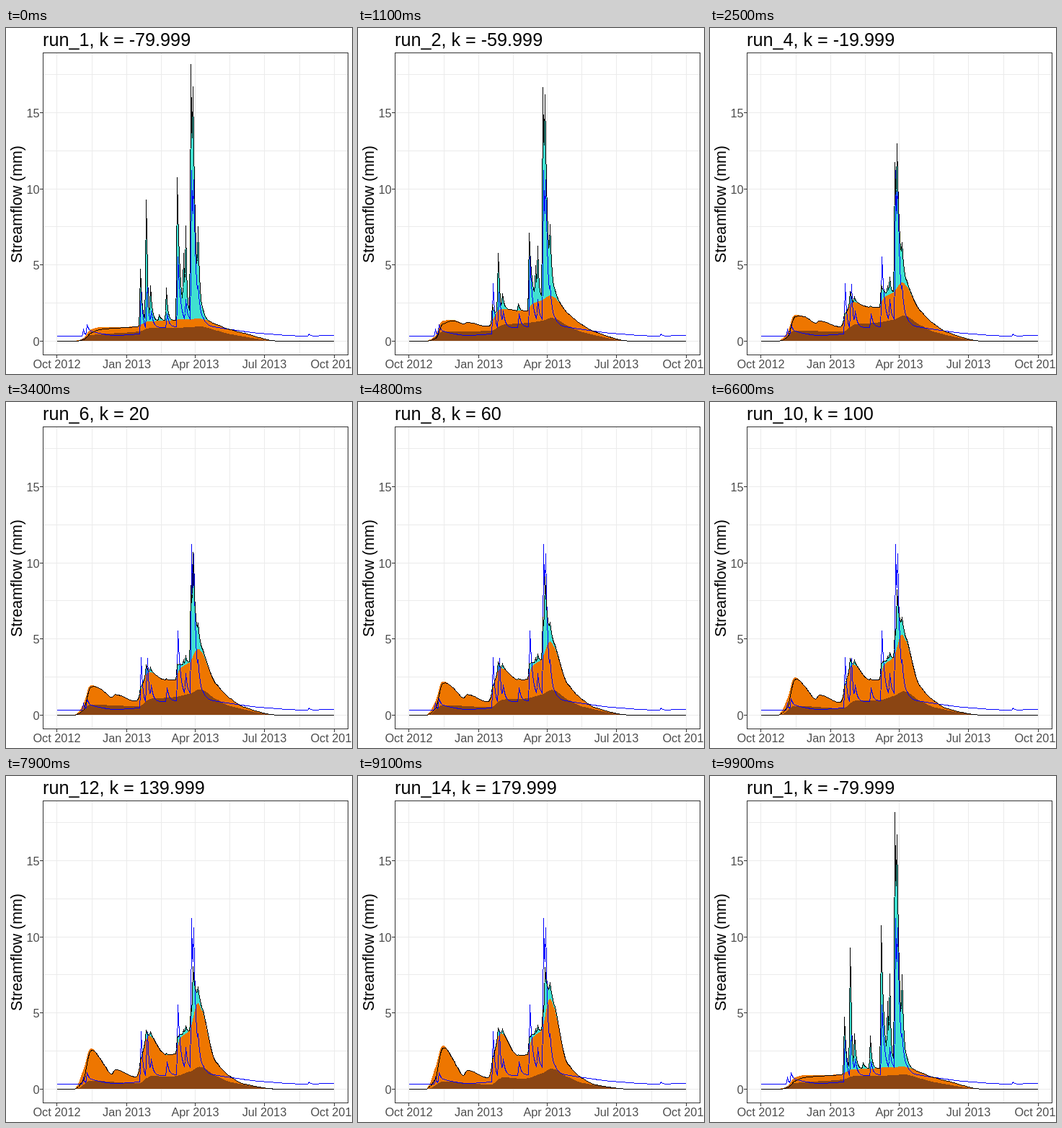
An HTML page that plays this animation: 480x480 px, repeating every 10 s.

```html
<!DOCTYPE html>
<html lang="en">
<head>
<meta charset="utf-8">
<title>Streamflow by run</title>
<style>
  html, body { margin: 0; width: 100%; height: 100%; overflow: hidden; background: #fff; }
  svg { display: block; width: 480px; height: 480px; }
  text { font-family: "Liberation Sans", Arial, sans-serif; }
  path, line, rect { shape-rendering: crispEdges; }
  .tick { font-size: 16.3px; fill: #4d4d4d; }
  .line { fill: none; stroke-width: 1; }
</style>
</head>
<body>
<svg viewBox="0 0 480 480">
  <rect width="480" height="480" fill="#fff"/>
  <g id="grid"></g>
  <path id="quick" fill="#40e0d0"/>
  <path id="inter" fill="#ee7600"/>
  <path id="base" fill="#8b4513"/>
  <path id="observed" class="line" stroke="#00f"/>
  <path id="total" class="line" stroke="#000"/>
  <rect x="51.5" y="34.5" width="423" height="419" fill="none" stroke="#333"/>
  <g id="axes"></g>
  <text id="title" x="51" y="25" font-size="25.2"></text>
  <text transform="translate(22 244.5) rotate(-90)" text-anchor="middle" font-size="21.4">Streamflow (mm)</text>
</svg>
<script>
const $ = id => document.getElementById(id);
const ZERO = 434.4, MM = 21.13, RUNS = 15, LOOP = 10000;
const days = Array.from({ length: 365 }, (_, d) => d);
const snap = v => Math.floor(v) + 0.5;
const dayX = d => 70.5 + d * 1.0547;
const mix = (a, b, f) => a + (b - a) * f;

// Slow flows: day, then height in pixels for a dry, middle and wet run
const interKeys = [
  [23, 0, 0, 0], [35.5, 4, 12, 30], [45, 16, 36, 60], [58, 19, 34, 42], [72, 19, 25, 19],
  [77, 19, 28, 26], [104, 20, 20, 16], [121, 27, 54, 77], [144, 28, 47, 46], [156, 29, 47, 48],
  [162, 30, 60, 70], [175, 30, 68, 82], [186, 31, 81, 125], [208, 24, 45, 38],
  [222, 18, 29, 20], [246, 11, 12, 6], [293, 0, 0, 0]
];
const baseKeys = [
  [25, 0, 0, 0], [45, 8, 14, 10], [108, 13, 13, 6], [124, 18, 23, 16], [150, 18, 25, 14],
  [176, 19, 30, 22], [188, 20, 35, 28], [208, 15, 23, 17], [230, 9, 12, 8], [295, 0, 0, 0]
];

// Quick flow: day, height in the first run, height left at the end, runs to fade, days to recede
const storms = [
  [110, 78, 8, 0.9, 2.5], [118, 167, 13, 1.4, 1.1], [123, 48, 6, 1.2, 2.5], [135, 8, 0, 0.8, 3],
  [144, 46, 2, 0.8, 2], [158, 198, 18, 1.6, 3.7], [167, 75, 6, 1.7, 1.5], [170, 112, 10, 1.9, 1.6],
  [176, 350, 25, 4, 3.5], [179, 173, 59, 5, 3.5], [186, 84, 13, 2.5, 2.3]
];

// Observed flow: slow part, and storms as day, height, days to recede
const gaugeKeys = [
  [0, 7], [32, 7], [50, 11], [75, 8], [108, 10], [130, 18], [160, 20], [185, 24],
  [205, 20], [230, 16], [266, 11], [330, 7], [364, 8]
];
const gaugeStorms = [
  [35, 10, 1.2], [40, 14, 4], [111, 69, 2.5], [119, 62, 2], [124, 20, 3.5], [145, 19, 3],
  [159, 97, 4], [170, 30, 3], [177, 210, 3.5], [180, 110, 3], [186, 22, 4], [332, 3, 2]
];

// Monotone cubic through [day, height] points, flat outside them
function smooth(points, d) {
  const last = points.length - 1;
  if (d <= points[0][0]) return points[0][1];
  if (d >= points[last][0]) return points[last][1];
  const rate = i => (points[i + 1][1] - points[i][1]) / (points[i + 1][0] - points[i][0]);
  const slope = i => {
    if (i === 0 || i === last) return 0;
    const a = rate(i - 1), b = rate(i);
    return a * b <= 0 ? 0 : 2 * a * b / (a + b);
  };
  const i = points.findIndex(p => p[0] > d) - 1;
  const [x0, y0] = points[i], [x1, y1] = points[i + 1];
  const h = x1 - x0, u = (d - x0) / h, w = 1 - u;
  return y0 * w * w * (1 + 2 * u) + y1 * u * u * (3 - 2 * u)
    + h * u * w * (slope(i) * w - slope(i + 1) * u);
}

// A sharp rise on the day before, then an exponential recession
function pulse(d, day, height, recede) {
  if (d < day - 1) return 0;
  return d < day ? 0.3 * height : height * Math.exp((day - d) / recede);
}

const sum = (list, f) => list.reduce((n, item) => n + f(item), 0);

function slowFlow(keys, run) {
  const w = Math.sqrt((run - 1) / 13.33);
  const points = keys.map(([day, dry, middle, wet]) => [day,
    dry * 2 * (w - 0.5) * (w - 1) + middle * 4 * w * (1 - w) + wet * 2 * w * (w - 0.5)]);
  return days.map(d => Math.max(0, smooth(points, d)));
}

function model(run) {
  const inter = slowFlow(interKeys, run), base = slowFlow(baseKeys, run);
  const fillDays = 4 + 14 * Math.exp(1 - run);
  const total = days.map(d => {
    const quick = sum(storms, ([day, first, end, fade, recede]) =>
      pulse(d, day, mix(end, first, Math.exp(-(((run - 1) / fade) ** 1.5))), recede));
    const filled = 1 - 0.5 * Math.exp(-Math.max(0, d - 36) / fillDays);
    return inter[d] * filled + quick;
  });
  return { inter, base, total };
}

const runs = Array.from({ length: RUNS }, (_, i) => model(i + 1));

const line = h => "M" + days.map(d => snap(dayX(d)) + " " + snap(ZERO - h[d])).join("L");
function area(h) {
  const floor = Math.floor(ZERO);
  const top = days.map(d => Math.floor(dayX(d)) + " " + Math.round(floor - h[d])).join("L");
  return `M${Math.floor(dayX(0))} ${floor}L${top}L${Math.floor(dayX(364))} ${floor}Z`;
}

const starts = [400, 1100, 1800, 2500, 3200, 3900, 4600, 5200, 5900, 6600, 7300, 7900, 8500, 9100, 9700];

// Position among the runs; each change takes three steps of 100 ms
function placeAt(t) {
  const n = starts.filter(s => s <= t).length;
  if (!n) return 0;
  const step = Math.min(3, Math.floor((t - starts[n - 1]) / 100) + 1);
  return (n - 1 + step / 3) % RUNS;
}

function titleFor(place) {
  const i = Math.round(place) % RUNS;
  const k = -79.999 + i * 279.998 / 14;
  return `run_${i + 1}, k = ${Number(k.toFixed(3))}`;
}

function drawFrame() {
  const rule = (x1, y1, x2, y2, c) => `<line x1="${x1}" y1="${y1}" x2="${x2}" y2="${y2}" stroke="${c}"/>`;
  const label = (x, y, anchor, s) =>
    `<text class="tick" x="${x}" y="${y}" text-anchor="${anchor}">${s}</text>`;
  const marks = [0, 92, 182, 273, 365];
  const names = ["Oct 2012", "Jan 2013", "Apr 2013", "Jul 2013", "Oct 2013"];
  const column = d => {
    const x = Math.round(dayX(d) - 0.01) + (d % 1 ? 0 : 0.5);
    return x;
  };
  let grid = "", axes = "";
  marks.forEach((d, i) => {
    const x = snap(dayX(d));
    grid += rule(x, 35, x, 453, "#ebebeb");
    if (i < 4) {
      const m = Math.round(dayX((d + marks[i + 1]) / 2)) + 0.5;
      grid += rule(m, 35, m, 453, "#ebebeb");
    }
    axes += rule(x, 454, x, 458, "#333") + label(dayX(d), 472, "middle", names[i]);
  });
  for (let v = 0; v < 18; v += 2.5) {
    const y = snap(ZERO - v * MM);
    grid += rule(52, y, 474, y, "#ebebeb");
    if (v % 5 === 0) axes += rule(47, y, 51, y, "#333") + label(46.5, y + 6, "end", v);
  }
  $("grid").innerHTML = grid;
  $("axes").innerHTML = axes;
  $("observed").setAttribute("d", line(days.map(d =>
    smooth(gaugeKeys, d) + sum(gaugeStorms, s => pulse(d, ...s)))));
}

let shown = -1;
function draw(t) {
  const place = placeAt(t);
  if (place === shown) return;
  shown = place;
  const i = Math.floor(place), a = runs[i], b = runs[(i + 1) % RUNS];
  const blend = part => a[part].map((h, d) => mix(h, b[part][d], place - i));
  const total = blend("total");
  $("quick").setAttribute("d", area(total));
  $("total").setAttribute("d", line(total));
  $("inter").setAttribute("d", area(blend("inter")));
  $("base").setAttribute("d", area(blend("base")));
  $("title").textContent = titleFor(place);
}

drawFrame();
draw(0);
const begin = performance.now();
function tick() {
  draw((performance.now() - begin) % LOOP);
  requestAnimationFrame(tick);
}
requestAnimationFrame(tick);
</script>
</body>
</html>
```
